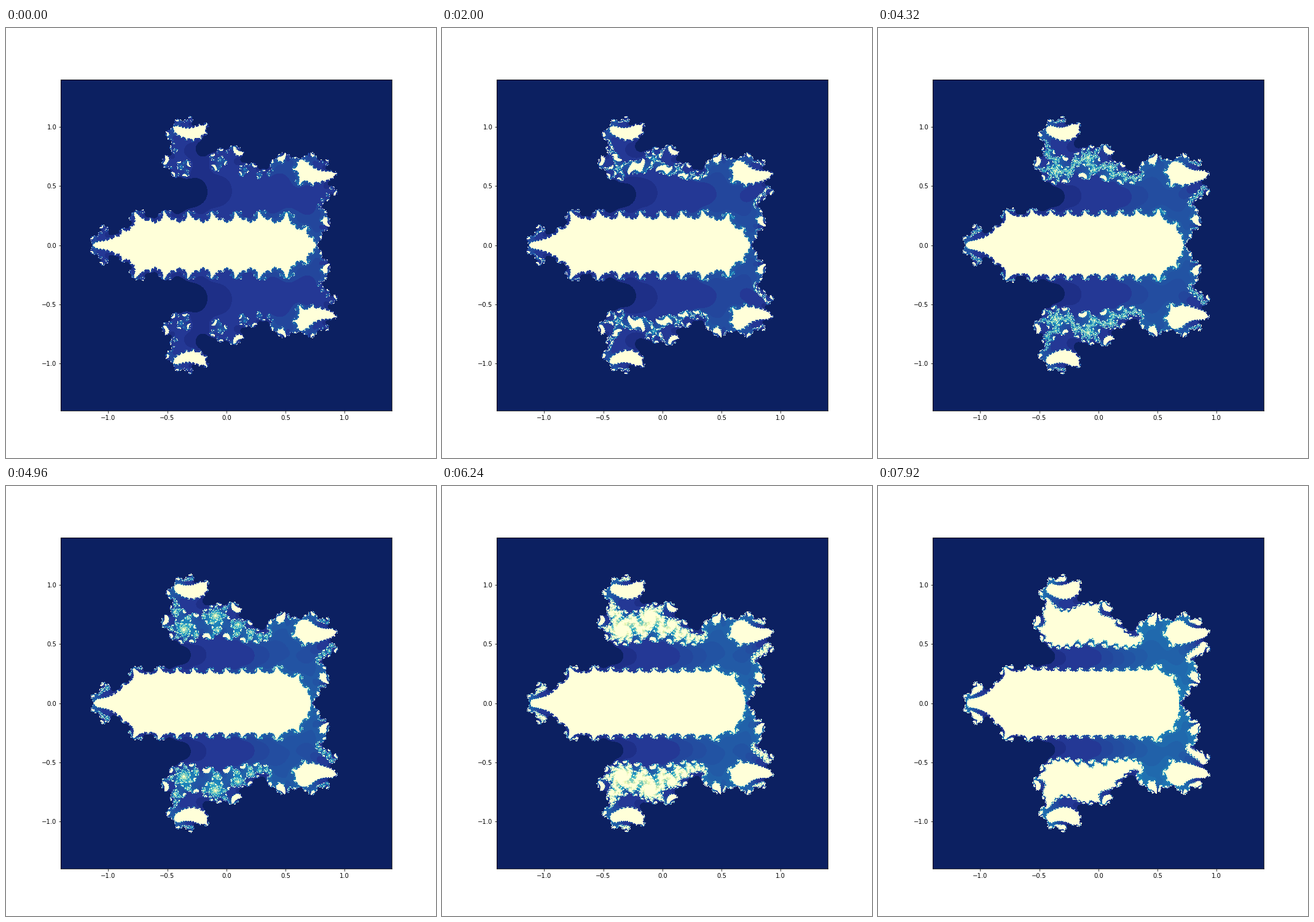
Write a matplotlib script that moves like this. It is 700 by 700 pixels and loops after 8000 ms.

```python
import numpy as np
import matplotlib.pyplot as plt
from matplotlib.animation import FuncAnimation

FRAMES = 100
INTERVAL = 80
MAX_ITER = 50
LIMIT = 1.4
HALF_ROWS = 270
SCALE = 0.72  # 72 dpi text and strokes on a 100 dpi figure

plt.rcParams.update({
    "font.family": "DejaVu Sans",
    "font.size": 10 * SCALE,
    "axes.linewidth": 0.8 * SCALE,
})
for axis in ("xtick", "ytick"):
    plt.rcParams.update({
        f"{axis}.major.size": 3.5 * SCALE,
        f"{axis}.major.pad": 3.5 * SCALE,
        f"{axis}.major.width": 0.8 * SCALE,
    })

# The set is symmetric about the real axis, so only the upper half is iterated.
xs = np.linspace(-LIMIT, LIMIT, 2 * HALF_ROWS - 1)
ys = np.linspace(0, LIMIT, HALF_ROWS)
grid = (xs[None, :] + 1j * ys[:, None]).ravel()

# Some neighbouring escape counts share one shade.
shade = np.arange(MAX_ITER + 1)
shade[:5] = 1
shade[6:9] = 7


def abs2(z):
    return z.real ** 2 + z.imag ** 2


def julia(delta):
    """Escape counts of z -> z^6 + z - delta."""
    counts = np.full(grid.size, MAX_ITER)
    index = np.arange(grid.size)
    z = grid
    attractor = -delta ** (1 / 6)
    for k in range(1, MAX_ITER):
        square = z * z
        z = square * square * square + z - delta
        escaped = abs2(z) > 4
        counts[index[escaped]] = k
        trapped = abs2(z - attractor) < 0.05 ** 2
        active = ~(escaped | trapped)
        z, index = z[active], index[active]
    upper = shade[counts].reshape(HALF_ROWS, -1)
    return np.vstack([upper[:0:-1], upper])


def delta_at(frame):
    return 0.2 - 0.001 * frame


fig, ax = plt.subplots(figsize=(7, 7), dpi=100)
image = ax.imshow(julia(delta_at(0)), cmap="YlGnBu_r", vmin=0, vmax=MAX_ITER,
                  origin="lower", interpolation="nearest",
                  extent=(-LIMIT, LIMIT, -LIMIT, LIMIT))
ticks = np.arange(-1, 1.1, 0.5)
ax.set_xticks(ticks)
ax.set_yticks(ticks)


def update(frame):
    image.set_data(julia(delta_at(frame)))
    return [image]


anim = FuncAnimation(fig, update, frames=FRAMES, interval=INTERVAL, repeat=True)
plt.show()
```
